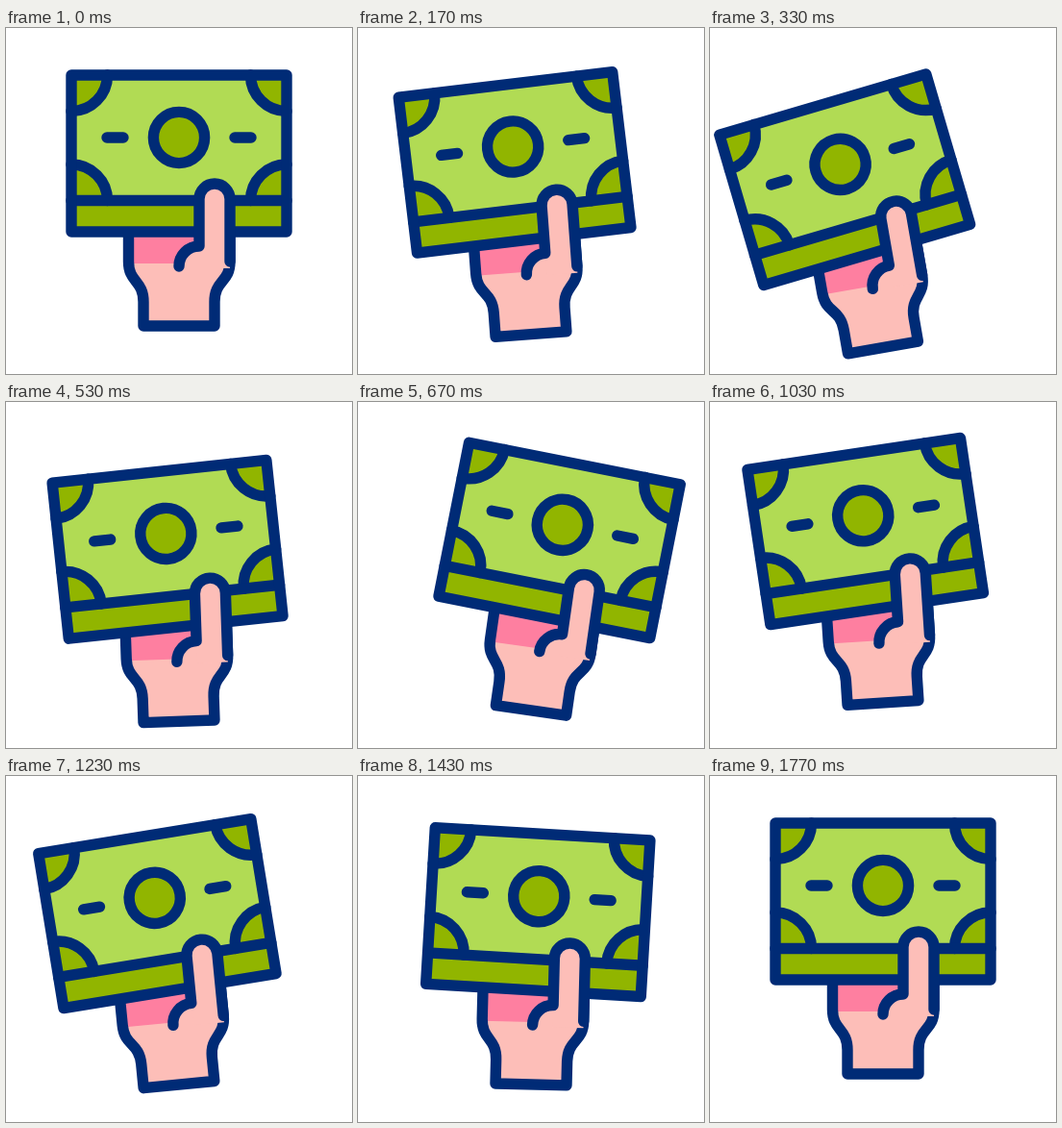
An HTML page for the animation above (2 s loop, 360 by 360 pixels).

```html
<!DOCTYPE html>
<html lang="en">
<head>
<meta charset="utf-8">
<title>Hand waving a banknote</title>
<style>
  html, body { margin: 0; width: 100%; height: 100%; overflow: hidden; background: #fff; }
  svg { display: block; width: 100vw; height: 100vh; }
  .line { fill: none; stroke: #002b76; stroke-width: 11.4; stroke-linecap: round; stroke-linejoin: round; }
  .light { fill: #b1db54; }
  .dark { fill: #91b500; }
  .skin { fill: #fdbeb8; }
  .pink { fill: #fe7fa0; }
</style>
</head>
<body>
<svg viewBox="0 0 360 360">
  <g id="hand">
    <path class="skin" d="M127.5 195V243C127.5 265 143 262 143 285V310H217V285C217 262 233 265 233 243V195Z"/>
    <path class="pink" d="M127.5 195H201V227A21 21 0 0 0 180 245H127.5Z"/>
    <path class="line" d="M127.5 195V243C127.5 265 143 262 143 285V310H217V285C217 262 233 265 233 243V195"/>
    <g id="bill">
      <path class="light" d="M68 49H292V180H68Z"/>
      <path class="dark" d="M68 179.5H292V212H68Z"/>
      <g class="dark">
        <path d="M68 49H105.5A37.5 37.5 0 0 1 68 86.5Z"/>
        <path d="M292 49H254.5A37.5 37.5 0 0 0 292 86.5Z"/>
        <path d="M68 179.5H105.5A37.5 37.5 0 0 0 68 142Z"/>
        <path d="M292 179.5H254.5A37.5 37.5 0 0 1 292 142Z"/>
        <circle cx="180" cy="114" r="26.6"/>
      </g>
      <g class="line">
        <path d="M105.5 49A37.5 37.5 0 0 1 68 86.5M254.5 49A37.5 37.5 0 0 0 292 86.5"/>
        <path d="M105.5 179.5A37.5 37.5 0 0 0 68 142M254.5 179.5A37.5 37.5 0 0 1 292 142"/>
        <circle cx="180" cy="114" r="26.6"/>
        <path d="M105 114H122M238 114H255M68 179.5H292"/>
        <path d="M68 49H292V212H68Z"/>
      </g>
    </g>
    <path class="skin" d="M201 250V178A16 16 0 0 1 233 178V250Z"/>
    <path class="line" d="M180 248A21 21 0 0 1 201 227V178A16 16 0 0 1 233 178V243"/>
  </g>
</svg>
<script>
  const LOOP = 2000;
  // Each key: [step at 30 per second, value]
  const drop = [[0, 0], [13, 26], [26, -1], [40, 12.7], [53, 0]];
  const swing = [[0, 0], [11.3, -10.3], [22, 10], [34.5, -7], [44.5, 2], [53, 0]];
  const tilt = [[0, 0], [12.5, -7.2], [24, 7], [33, -6.4], [43.5, 2], [53, 0]];

  const hand = document.getElementById('hand');
  const bill = document.getElementById('bill');

  function valueAt(keys, step) {
    const i = keys.findIndex(key => key[0] > step);
    if (i < 0) return keys[keys.length - 1][1];
    const [[t0, v0], [t1, v1]] = [keys[i - 1], keys[i]];
    const u = (step - t0) / (t1 - t0);
    return v0 + (v1 - v0) * u * u * (3 - 2 * u);
  }

  // Steps begin on whole hundredths of a second.
  function stepAt(ms) {
    const n = Math.floor(ms * 0.03 + 0.15);
    return Math.round(n * 10 / 3) * 10 > ms ? n - 1 : n;
  }

  function draw(ms) {
    const step = stepAt(ms % LOOP);
    hand.setAttribute('transform',
      `translate(0 ${valueAt(drop, step)}) rotate(${valueAt(swing, step)} 180 310)`);
    bill.setAttribute('transform', `rotate(${valueAt(tilt, step)} 180 211)`);
  }

  const start = performance.now();
  function tick() {
    draw(performance.now() - start);
    requestAnimationFrame(tick);
  }
  tick();
</script>
</body>
</html>
```
